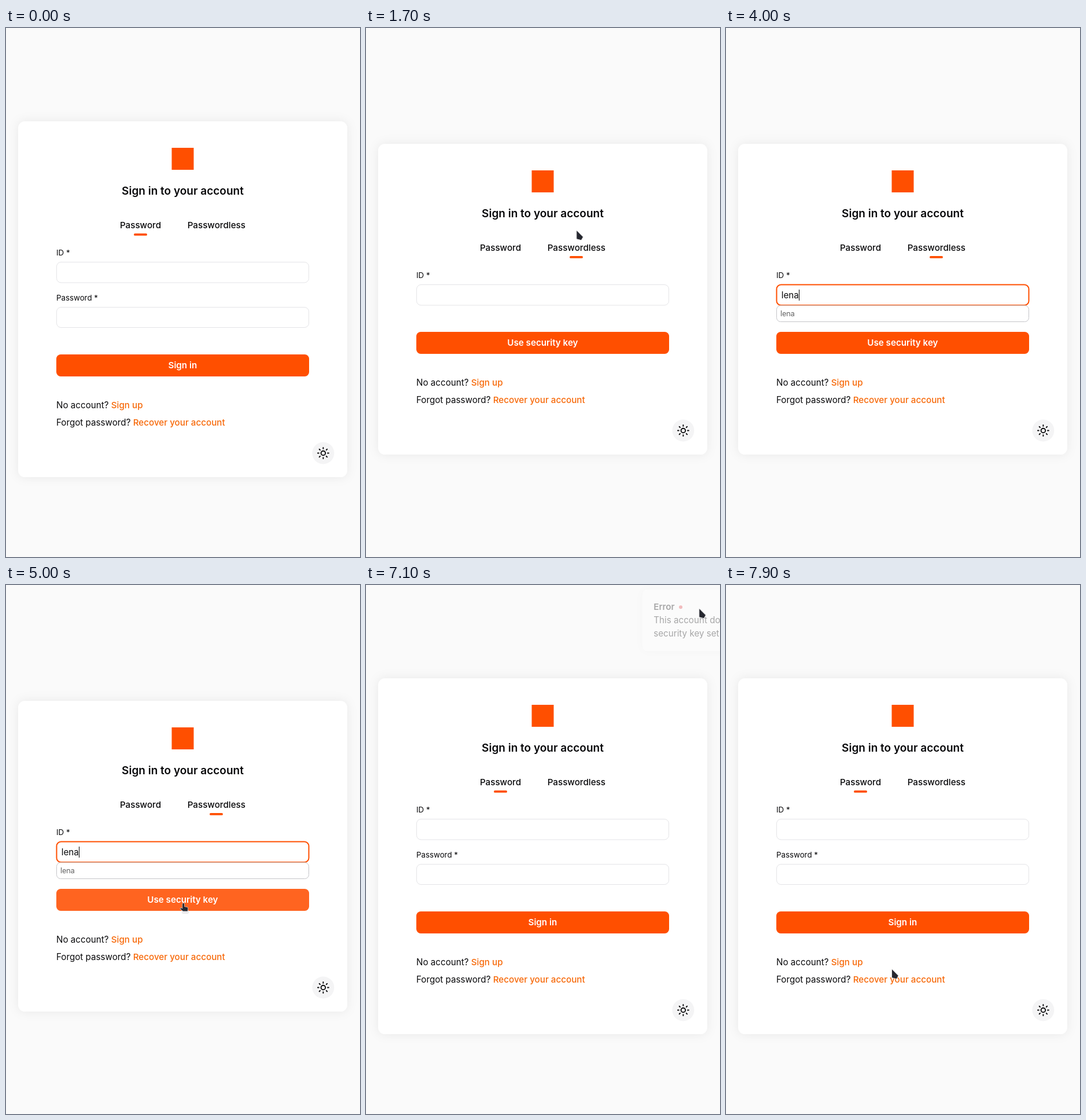
An HTML page that plays this animation: 612x914 px, repeating every 8000 ms.

```html
<!DOCTYPE html>
<html lang="en">
<head>
<meta charset="utf-8">
<title>Sign in</title>
<style>
  html, body { margin: 0; width: 100%; height: 100%; overflow: hidden; background: #fafafa; }
  svg { display: block; width: 612px; height: 914px; }
  text { font: 400 15.2px Inter, sans-serif; fill: #09090b; white-space: pre; }
  .title { font-size: 19px; font-weight: 600; }
  .bold { font-weight: 600; }
  .tab { font-weight: 500; }
  .label { font-size: 13.3px; }
  .link { font-weight: 500; fill: #f76808; }
  .mid { text-anchor: middle; }
  .white { fill: #fff; }
  .hint { font-size: 12.67px; font-weight: 300; fill: #333; }
  .panel { fill: #fff; filter: drop-shadow(0 0 9px rgba(0, 0, 0, .07)); }
  .field { fill: #fff; stroke: #e4e4e7; stroke-width: 1; }
  .field.focus { stroke: #ff4f00; stroke-width: 2; }
  .brand { fill: #ff4f00; }
  .button { fill: #ff4f00; }
  .button.hover { fill: #ff6420; }
  .line { fill: none; stroke: #09090b; stroke-linecap: round; }
  .ink { fill: #25272f; stroke: #fff; stroke-width: 1.2; paint-order: stroke; stroke-linejoin: round; }
  .pointer { filter: drop-shadow(0 .5px .7px rgba(0, 0, 0, .4)); }
</style>
</head>
<body>
<svg viewBox="0 0 612 914">
  <rect id="card" class="panel" x="21" width="569" rx="11.4"/>

  <g id="top">
    <rect class="brand" x="286.5" y="207" width="38" height="38"/>
    <text class="title mid" x="305.5" y="288">Sign in to your account</text>
    <text class="tab mid" x="232.5" y="346">Password</text>
    <text class="tab mid" x="363.8" y="346">Passwordless</text>
    <rect id="mark" class="brand" y="355" width="23" height="3.8" rx="1.9"/>
    <text class="label" x="87" y="393">ID *</text>
    <rect id="idField" class="field" x="87.5" y="404.5" width="436" height="35.5" rx="7.6"/>
    <text id="typed" x="95.8" y="428"></text>
    <rect id="caret" x="96" y="413" width="1" height="19"/>
    <g id="hints">
      <rect x="87.5" y="440.5" width="436" height="28" rx="7" fill="#fff" stroke="#c4c4c8"/>
      <text class="hint" x="94" y="459">lena</text>
    </g>
  </g>

  <g id="secret">
    <text class="label" x="87" y="471">Password *</text>
    <rect class="field" x="87.5" y="482.5" width="436" height="35" rx="7.6"/>
  </g>

  <g id="bottom">
    <rect id="button" class="button" x="87" y="564" width="437" height="38" rx="7.6"/>
    <text id="action" class="bold mid white" x="305.4" y="588"></text>
    <text x="87" y="657">No account? <tspan class="link">Sign up</tspan></text>
    <text x="87" y="687">Forgot password? <tspan class="link">Recover your account</tspan></text>
    <circle cx="548.4" cy="734.5" r="19" fill="#f4f4f5"/>
    <g id="sun" class="line" transform="translate(548.4 734.5) scale(.95)" stroke-width="2">
      <circle r="4"/>
    </g>
  </g>

  <g id="toast">
    <rect class="panel" x="238" y="8" width="364.5" height="106" rx="7.6"/>
    <text class="bold" x="257" y="43">Error</text>
    <circle cx="303.8" cy="38.3" r="3" fill="#e5484d"/>
    <text x="257" y="66">This account does not exist or has no</text>
    <text x="257" y="89">security key set up.</text>
    <path class="line" stroke-width="1.3" d="M571.5 30l8.4 8.4m0-8.4l-8.4 8.4"/>
  </g>

  <g id="cursor">
    <path id="arrow" class="ink pointer" d="M.3 .3L11 11L8 16.3L.3 14.3Z"/>
    <g id="hand" class="pointer">
      <path d="M-2 12.5H8V17H-2Z" fill="#e4e4e8" stroke="#fff"/>
      <path class="ink" d="M-1.8 1.2Q-1.6 0 -.3 0Q1.3 0 1.4 1.4V6L6 6.8Q7.6 7.3 7.5 9L7 13.6H-1L-5.4 9.8Q-6 8.6 -4.8 8.1L-1.8 9Z"/>
    </g>
    <g id="beam" fill="none">
      <path id="beamEdge" stroke="#d0d0d4" stroke-width="2.6" d="M-2.5 -6.5H2.5M0 -6.5V6.5M-2.5 6.5H2.5"/>
      <path stroke="#25272f" d="M-2.5 -6.5H2.5M0 -6.5V6.5M-2.5 6.5H2.5"/>
    </g>
  </g>
</svg>
<script>
const LOOP = 8000, STEP = 100, SHIFT = 39;
const el = id => document.getElementById(id);
const show = (id, on) => el(id).style.display = on ? "" : "none";
const move = (id, x, y) => el(id).setAttribute("transform", `translate(${x} ${y})`);

// Pointer strokes: start time, then one x, y pair per step
const strokes = [
  [200, 182, 3, 250, 62, 340, 180, 420, 300, 449, 368, 436, 366, 405, 359, 376, 352, 363, 350, 364, 350],
  [1800, 361, 357, 350, 378, 330, 405, 308, 435, 290, 456, 284, 461.5],
  [4500, 284, 464, 286, 475, 291, 496, 298, 520, 305, 541, 307, 550, 307.7, 551.5],
  [6100, 325, 520, 390, 420, 480, 270, 560, 140, 600, 72, 596, 52, 582, 43, 576, 41],
  [7200, 560, 72, 515, 165, 450, 310, 385, 455, 326, 582, 300, 645, 289, 668, 286.7, 664]
];
const typing = [[0, ""], [3500, "l"], [3700, "le"], [3800, "len"], [4000, "lena"]];
const toastOffset = [
  [0, 1], [5300, .5], [5400, .12], [5500, 0], [7100, .66], [7200, 1]
];

const latest = (table, t) => table.filter(row => row[0] <= t).pop();

function pointerAt(t) {
  const [start, ...path] = latest(strokes, t);
  const i = Math.min(Math.round((t - start) / STEP), path.length / 2 - 1) * 2;
  return [path[i], path[i + 1]];
}

function inside([x, y], left, top, right, bottom) {
  return x >= left && x <= right && y >= top && y <= bottom;
}

function drawPointer(t, shift, away) {
  const visible = t >= 200 && !(t >= 3500 && t < 4500);
  show("cursor", visible);
  const p = visible ? pointerAt(t) : [-99, -99];
  const onButton = inside(p, 87, 564 - shift, 524, 602 - shift);
  const onTab = inside(p, 182, 328 + shift, 283, 361 + shift) ||
                inside(p, 299, 328 + shift, 429, 361 + shift);
  const onClose = !away && inside(p, 565, 24, 587, 44);
  const onField = inside(p, 87, 404 + shift, 524, 440 + shift) ||
                  !shift && inside(p, 87, 482, 524, 518);
  const hand = onButton || onTab || onClose;
  move("cursor", ...p);
  show("hand", hand);
  show("beam", onField);
  show("arrow", !hand && !onField);
  el("button").classList.toggle("hover", onButton);
}

function draw(t) {
  const keyMode = t >= 1700 && t < 5300;
  const shift = keyMode ? SHIFT : 0;
  const focus = t >= 2400 && t < 5100;
  const away = latest(toastOffset, t)[1];

  el("card").setAttribute("y", 161.3 + shift);
  el("card").setAttribute("height", 614.7 - 2 * shift);
  move("top", 0, shift);
  move("bottom", 0, -shift);
  show("secret", !keyMode);
  el("mark").setAttribute("x", keyMode ? 352 : 221);
  el("action").textContent = keyMode ? "Use security key" : "Sign in";

  el("idField").classList.toggle("focus", focus);
  el("typed").textContent = keyMode ? latest(typing, t)[1] : "";
  el("caret").setAttribute("x", 96 + Math.round(el("typed").getComputedTextLength()));
  show("caret", focus);
  show("hints", t >= 3600 && t < 5100);

  show("toast", away < 1);
  move("toast", 364 * away, 0);
  el("toast").style.opacity = 1 - away;
  drawPointer(t, shift, away);
}

for (let a = 0; a < 360; a += 45) {
  const ray = document.createElementNS("http://www.w3.org/2000/svg", "path");
  ray.setAttribute("d", "M8 0H10");
  ray.setAttribute("transform", `rotate(${a})`);
  el("sun").append(ray);
}

const begin = performance.now();
function tick() {
  const t = (performance.now() - begin) % LOOP;
  draw(Math.floor(t / STEP) * STEP);
  requestAnimationFrame(tick);
}
tick();
</script>
</body>
</html>
```
